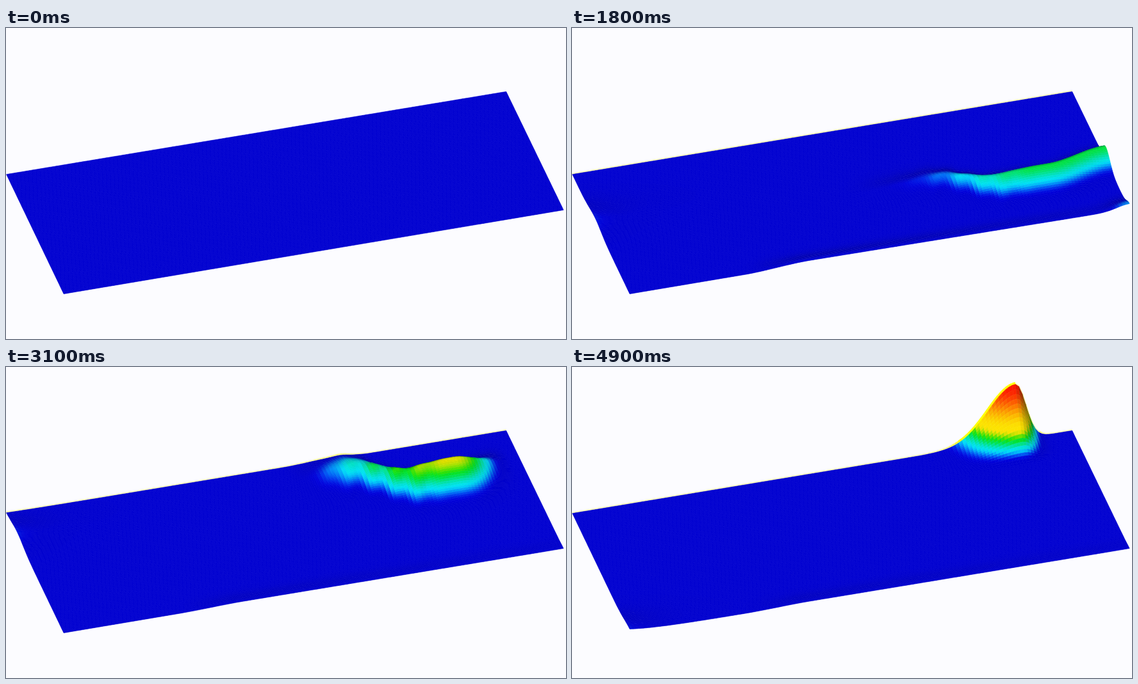
An HTML page with a canvas for the animation above (5 s loop, 874 px wide and 486 px high).

```html
<!DOCTYPE html>
<html lang="en">
<head>
<meta charset="utf-8">
<title>Wave run-up</title>
<style>
html, body { margin: 0; width: 100%; height: 100%; overflow: hidden; background: #fcfcff; }
canvas { display: block; }
</style>
</head>
<body>
<canvas id="stage" width="874" height="486"></canvas>
<script>
const ctx = document.getElementById('stage').getContext('2d');
const LOOP = 5000, STEP = 100, NU = 150, NV = 100;

const clamp = (x, a = 0, b = 1) => Math.min(b, Math.max(a, x));
const mix = (a, b, k) => a + (b - a) * k;
// Eases from 0 at a to 1 at b; a may be greater than b.
const smooth = (a, b, x) => { const k = clamp((x - a) / (b - a)); return k * k * (3 - 2 * k); };
const bell = x => Math.exp(-x * x / 2);

// Tank plane: u runs along the length, v from the far to the near edge.
const project = (u, v, h) => ({
  x: .6 + 780 * u + 89.5 * v,
  y: 228.7 - 129.3 * u + 186.8 * v - 1.8 * u * v - h,
  h
});

// The crest runs from the near edge to the far one, bending as it goes.
function crest(t) {
  const travel = 1 - (t - 500) / 3750;
  const bend = smooth(1000, 2200, t), grow = smooth(500, 1300, t);
  const late = smooth(2200, 3500, t), shore = smooth(3000, 3800, t);
  const size = (16 + 6 * grow + 13 * late) * smooth(0, 500, t) * smooth(4500, 3900, t);
  const left = mix(.26, .62, grow) + .1 * shore, soft = .06 + .08 * grow * (1 - late);
  const right = mix(1.15, .9, smooth(2200, 3300, t));
  const front = .05 + .05 * smooth(500, 3300, t);
  const comb = bend * smooth(4500, 3800, t);

  return u => {
    const lead = smooth(.78, .66, u);
    const pos = travel - bend * (1 - shore) * (.18 * lead + .09 * smooth(.88, 1, u));
    const body = mix(1, .5 + .5 * smooth(.65, .86, u), grow);
    const amp = size * body * smooth(left - soft, left + soft, u) * smooth(right + .06, right - .06, u);
    const back = .05 + .05 * Math.max(lead * late, shore);
    const teeth = comb * bell((u - .71) / .06);
    return v => {
      const wave = teeth * Math.sin(130 * u + 18 * v);
      const d = v - pos - .012 * wave;
      return amp * (1 + .14 * wave) * bell(d / (d > 0 ? front : back));
    };
  };
}

function surface(t) {
  const ridge = crest(t);
  const corner = 28 * smooth(0, 500, t) * smooth(2500, 500, t);
  const lip = 9 * smooth(500, 1300, t) * (1 - .75 * smooth(1300, 2200, t));
  const echo = 6 * smooth(0, 500, t), echoPos = Math.abs(t - 2680) / 2200;
  const peak = 92 * smooth(3800, 4700, t) - 5 * smooth(4600, 4900, t);

  return Array.from({ length: NU + 1 }, (_, a) => {
    const u = a / NU, ridgeAt = ridge(u);
    const cornerU = corner * bell((u - 1) / .025);
    const lipU = lip * smooth(.23, .36, u) * (1 - .6 * clamp((u - .36) / .6));
    const echoU = echo * Math.exp(-u / .06);
    const peakU = peak * bell((u - .887) / (u < .887 ? .055 : .02));
    return Array.from({ length: NV + 1 }, (_, b) => {
      const v = b / NV;
      const h = ridgeAt(v)
        + cornerU * bell((v - 1) / .05)
        + lipU * bell((v - 1) / .04)
        + echoU * bell((v - echoPos) / .1)
        + peakU * Math.pow(clamp(1 - v / .2), 1.35);
      return project(u, v, h);
    });
  });
}

// Blue, cyan, green, yellow, red with height; darker on far and right slopes.
function tint(h, su, sv) {
  const shade = clamp(1 - .16 * Math.max(0, -su) - .4 * Math.max(0, sv), .25);
  const r = 252 * smooth(22, 34, h);
  const g = 226 * smooth(4, 14, h) * (1 - .9 * smooth(36, 86, h));
  const b = (208 + 40 * smooth(2, 10, h)) * smooth(27, 12, h);
  return `rgb(${[r, g, b].map(c => Math.round(c * shade))})`;
}

function drawRim(points) {
  for (let a = 0; a < NU; a++) {
    const p = points[a][0], q = points[a + 1][0];
    const k = q.h - p.h < -4 ? 0 : clamp((p.h + q.h) / 24);
    ctx.strokeStyle = `rgba(255,255,${Math.round(160 * (1 - k))},${.65 + .35 * k})`;
    ctx.lineWidth = 2.4 + 3 * k;
    ctx.beginPath();
    ctx.moveTo(p.x, p.y - 1);
    ctx.lineTo(q.x, q.y - 1);
    ctx.stroke();
  }
}

function drawCell(p, q, r, s) {
  const su = (q.h + r.h - p.h - s.h) / 2 * NU / 790;
  const sv = (r.h + s.h - p.h - q.h) / 2 * NV / 207;
  ctx.fillStyle = ctx.strokeStyle = tint((p.h + q.h + r.h + s.h) / 4, su, sv);
  ctx.beginPath();
  ctx.moveTo(p.x, p.y);
  for (const c of [q, r, s]) ctx.lineTo(c.x, c.y);
  ctx.closePath();
  ctx.fill();
  ctx.stroke();
}

function draw(t) {
  ctx.fillStyle = '#fcfcff';
  ctx.fillRect(0, 0, 874, 486);
  const points = surface(t);
  if (t > 0) drawRim(points);
  ctx.lineWidth = .6;
  for (let b = 0; b < NV; b++) {
    for (let a = 0; a < NU; a++) {
      drawCell(points[a][b], points[a + 1][b], points[a + 1][b + 1], points[a][b + 1]);
    }
  }
}

let shown = -1;
const start = performance.now();
function tick() {
  const t = Math.floor((performance.now() - start) % LOOP / STEP) * STEP;
  if (t !== shown) draw(shown = t);
  requestAnimationFrame(tick);
}
tick();
</script>
</body>
</html>
```
